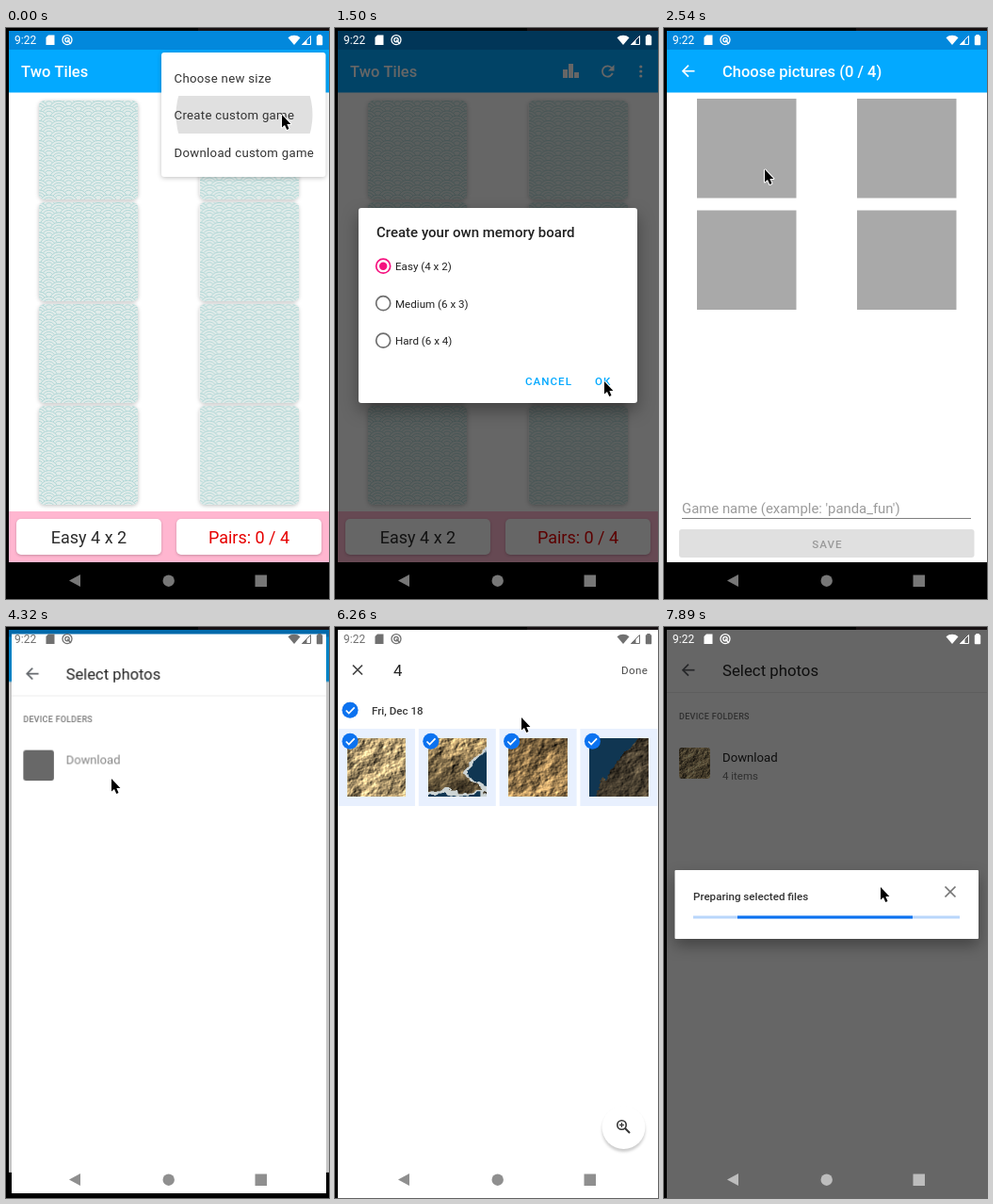
Recreate the animation shown at these times as an HTML page with a canvas. Size 343 by 606 pixels, loop 8000 ms.

```html
<!DOCTYPE html>
<html lang="en">
<head>
<meta charset="utf-8">
<title>Custom board walkthrough</title>
<style>
html, body { margin: 0; width: 100%; height: 100%; overflow: hidden; background: #000; }
canvas { display: block; }
</style>
</head>
<body>
<canvas id="stage" width="343" height="606"></canvas>
<script>
const W = 343, H = 606, LOOP = 8000, STEP = 149, TAU = Math.PI * 2;
const FONT = 'Roboto, "Noto Sans", sans-serif';
const BLUE = '#03a9ff', CHECK = '#0b72f0';

const makeContext = (w, h) => {
  const canvas = document.createElement('canvas');
  canvas.width = w;
  canvas.height = h;
  return canvas.getContext('2d');
};
const stage = document.getElementById('stage').getContext('2d');
const buffer = makeContext(W, H);
let g = stage;

// ---- timing ----
const heldTime = t => STEP * Math.floor((t + 8) / STEP);
const ramp = (t, a, b) => Math.max(0, Math.min(1, (t - a) / (b - a)));
const easeOut = p => 1 - (1 - p) ** 3;
const smooth = p => p * p * (3 - 2 * p);
const mix = (a, b, p) => a + (b - a) * p;

const MOVES = [
  { from: 450, to: 1490, x: 286, y: 375 },   // OK
  { from: 1930, to: 2530, x: 107, y: 150 },  // first slot
  { from: 2840, to: 3270, x: 148, y: 227 },
  { from: 3270, to: 3570, x: 112, y: 161 },
  { from: 4330, to: 4760, x: 88, y: 147 },   // folder
  { from: 5060, to: 5660, x: 15, y: 89 },    // date check
  { from: 5950, to: 6250, x: 198, y: 96 },
  { from: 6260, to: 7000, x: 332, y: 39 },   // Done
  { from: 7300, to: 7890, x: 230, y: 276 }
];
function pointerAt(t) {
  let x = 293, y = 92;
  for (const move of MOVES) {
    const p = smooth(ramp(t, move.from, move.to));
    x = mix(x, move.x, p);
    y = mix(y, move.y, p);
  }
  return [x, y];
}

// ---- drawing helpers ----
function rect(x, y, w, h, color) {
  g.fillStyle = color;
  g.fillRect(x, y, w, h);
}
function round(x, y, w, h, r, color) {
  g.fillStyle = color;
  g.beginPath();
  g.roundRect(x, y, w, h, r);
  g.fill();
}
function shadowed(blur, drop, strength, draw) {
  g.save();
  g.shadowColor = `rgba(0,0,0,${strength})`;
  g.shadowBlur = blur;
  g.shadowOffsetY = drop;
  draw();
  g.restore();
}
function raised(x, y, w, h, r, blur, drop, strength) {
  shadowed(blur, drop, strength, () => round(x, y, w, h, r, '#fff'));
}
function disc(x, y, r, color) {
  g.fillStyle = color;
  g.beginPath();
  g.arc(x, y, r, 0, TAU);
  g.fill();
}
function ring(x, y, r, width, color, start = 0, end = TAU) {
  g.strokeStyle = color;
  g.lineWidth = width;
  g.beginPath();
  g.arc(x, y, r, start, end);
  g.stroke();
}
function trace(points) {
  g.beginPath();
  points.forEach(([x, y], i) => i ? g.lineTo(x, y) : g.moveTo(x, y));
}
function poly(points, color) {
  trace(points);
  g.fillStyle = color;
  g.fill();
}
function line(points, width, color) {
  trace(points);
  g.strokeStyle = color;
  g.lineWidth = width;
  g.stroke();
}
function text(s, x, y, size, color, { weight = 400, align = 'left', spacing = 0 } = {}) {
  g.font = `${weight} ${size}px ${FONT}`;
  g.letterSpacing = spacing + 'px';
  g.textAlign = align;
  g.textBaseline = 'alphabetic';
  g.fillStyle = color;
  g.fillText(s, x, y + size * 0.355);
}
// Draws a whole window, scaled about the middle of the screen.
function layer(draw, scale = 1, alpha = 1) {
  if (alpha <= 0) return;
  g = buffer;
  g.clearRect(0, 0, W, H);
  draw();
  g = stage;
  g.save();
  g.globalAlpha = alpha;
  g.translate(173, 303);
  g.scale(scale, scale);
  g.translate(-173, -303);
  g.drawImage(buffer.canvas, 3, 3, W - 3, H - 3, 3, 3, W - 3, H - 3);
  g.restore();
}
const dim = amount => rect(3, 3, W - 3, H - 3, `rgba(0,0,0,${amount})`);

// ---- textures ----
function render(size, draw) {
  g = makeContext(size, size);
  draw();
  const canvas = g.canvas;
  g = stage;
  return canvas;
}
const cardFace = render(105, () => {
  const r = 10.5, paper = '#e2ecea';
  g.beginPath();
  g.roundRect(0, 0, 105, 105, 6);
  g.clip();
  rect(0, 0, 105, 105, paper);
  for (let row = 0; row < 24; row++) {
    for (let col = -1; col < 7; col++) {
      const x = (col + row % 2 / 2) * 2 * r, y = row * r / 2;
      disc(x, y, r, paper);
      for (let k = 0; k < 3; k++) ring(x, y, r - 0.4 - k * 2.8, 0.75, '#9fcfcf');
    }
  }
});

function hash(x, y) {
  const s = Math.sin(x * 127.1 + y * 311.7) * 43758.5453;
  return s - Math.floor(s);
}
function noise(x, y) {
  const i = Math.floor(x), j = Math.floor(y), p = smooth(x - i), q = smooth(y - j);
  return mix(mix(hash(i, j), hash(i + 1, j), p), mix(hash(i, j + 1), hash(i + 1, j + 1), p), q);
}
function relief(u, v, seed) {
  let sum = 0;
  for (let k = 0, f = 1; k < 4; k++, f *= 2) {
    sum += noise((u * 5 + v * 3) * f + seed, (v * 5 - u * 2) * f + seed) * 0.62 ** k;
  }
  return sum / 2.2;
}
// Soft rocky slopes lit from one side; `sea` is positive where water lies.
const PHOTOS = [
  { rock: [178, 155, 112], light: () => 1, sea: () => -1 },
  { rock: [158, 134, 92], light: (u, v) => 1.15 - 0.75 * v, foam: true,
    sea: (u, v) => Math.max(u - 0.58 - 1.1 * Math.abs(v - 0.55), v - 0.91) },
  { rock: [150, 121, 78], light: (u, v) => 0.75 + 0.4 * v, sea: () => -1 },
  { rock: [72, 63, 48], light: u => 0.7 + 0.4 * u, sea: (u, v) => 0.8 - u - 0.78 * v }
].map(({ rock, light, sea, foam }, n) => render(84, () => {
  const image = g.createImageData(84, 84), seed = n * 17 + 3;
  for (let i = 0; i < 84 * 84; i++) {
    const u = i % 84 / 84, v = Math.floor(i / 84) / 84, h = relief(u, v, seed);
    const slope = relief(u + 0.02, v + 0.012, seed) - h;
    const shade = light(u, v) * (0.55 + 0.85 * h + slope * 5);
    const depth = sea(u, v) + (h - 0.5) * 0.25;
    let color = rock.map(c => c * shade);
    if (depth > 0) color = foam && depth < 0.06 ? [205, 212, 212] : [16, 54, 82];
    image.data.set([...color, 255], i * 4);
  }
  g.putImageData(image, 0, 0);
}));

// ---- icons ----
function backArrow(x, y, color) {
  line([[x + 6.5, y], [x - 5.5, y]], 1.7, color);
  line([[x, y - 6], [x - 6, y], [x, y + 6]], 1.7, color);
}
function cross(x, y, r, color) {
  line([[x - r, y - r], [x + r, y + r]], 1.7, color);
  line([[x + r, y - r], [x - r, y + r]], 1.7, color);
}
function tick(x, y, alpha) {
  g.save();
  g.globalAlpha *= alpha;
  disc(x, y, 8.5, CHECK);
  line([[x - 4.3, y + 0.2], [x - 1.3, y + 3.2], [x + 4.7, y - 3]], 1.7, '#fff');
  g.restore();
}
function statusIcons(color) {
  text('9:22', 9, 12.6, 12, color);
  poly([[45, 7.5], [51.5, 7.5], [51.5, 18], [42.5, 18], [42.5, 10]], color);
  ring(65, 12.6, 5, 1.3, color);
  ring(65, 12.6, 2.2, 1.3, color);
  line([[65, 12.6], [69, 17]], 1.4, color);
  g.fillStyle = color;
  g.beginPath();
  g.moveTo(306, 18);
  g.arc(306, 18, 10.2, -Math.PI * 0.72, -Math.PI * 0.28);
  g.fill();
  line([[314.5, 17.5], [323.5, 17.5], [323.5, 8.5], [314.5, 17.5]], 1, color);
  poly([[314, 18], [319.5, 12.5], [319.5, 18]], color);
  rect(331.3, 7, 3.4, 2, color);
  round(329.8, 8.2, 6.4, 10, 0.8, color);
}
function navIcons(color) {
  poly([[67, 586.5], [79, 580], [79, 593]], color);
  disc(172.7, 586.7, 6.2, color);
  rect(264.5, 580.5, 12.5, 12.5, color);
}
function pointer(x, y) {
  g.save();
  g.translate(x, y);
  g.lineJoin = 'round';
  const arrow = [[0, 0], [0, 13.6], [3, 10.9], [5.3, 16], [7.5, 15], [5.4, 10.1], [9.4, 9.9], [0, 0]];
  line(arrow, 2, '#fff');
  poly(arrow, '#000');
  g.restore();
}
function magnifier(x, y) {
  ring(x, y, 4.7, 1.6, '#333');
  line([[x + 3.5, y + 3.5], [x + 8.5, y + 8.5]], 2, '#333');
  line([[x - 2.5, y], [x + 2.5, y]], 1.2, '#333');
  line([[x, y - 2.5], [x, y + 2.5]], 1.2, '#333');
}

// ---- windows ----
function appBase() {
  rect(3, 3, 340, 564, '#fff');
  rect(3, 3, 340, 20, '#0288dc');
  rect(3, 23, 340, 45.5, BLUE);
  rect(3, 567, 340, 39, '#000');
}
function game() {
  appBase();
  text('Two Tiles', 16, 46.3, 16.5, '#fff', { weight: 500 });
  rect(242, 44, 5, 9, '#fff');
  rect(248, 38, 5, 15, '#fff');
  rect(254, 47, 5, 6, '#fff');
  ring(289.5, 46, 5.6, 1.8, '#fff', 0.35, TAU - 0.75);
  poly([[296.5, 39], [296.5, 45.5], [290, 45.5]], '#fff');
  for (let i = 0; i < 3; i++) disc(324.8, 41 + i * 5, 1.6, '#fff');
  for (let i = 0; i < 8; i++) {
    const x = 35 + i % 2 * 170.5, y = 77 + Math.floor(i / 2) * 108;
    raised(x, y, 105, 105, 6, 4, 1, 0.25);
    g.drawImage(cardFace, x, y);
  }
  rect(3, 513, 340, 54, '#ffb6d0');
  ['Easy 4 x 2', 'Pairs: 0 / 4'].forEach((s, i) => {
    raised(11 + i * 170, 521, 154, 38, 5, 3, 1, 0.22);
    text(s, 88 + i * 170, 541, 18, i ? '#e60000' : '#2c2c2c', { align: 'center' });
  });
}
function menu(pressedFully) {
  raised(165, 26, 174.5, 132, 3, 5, 1, 0.25);
  g.save();
  g.beginPath();
  g.rect(165, 72, 174.5, 40);
  g.clip();
  disc(253, 92, pressedFully ? 110 : 72.5, '#e0e0e0');
  g.restore();
  ['Choose new size', 'Create custom game', 'Download custom game'].forEach((s, i) =>
    text(s, 178.5, 53 + i * 39.6, 13.2, '#333', { spacing: 0.3 }));
}
function sizeDialog() {
  raised(25, 191, 296, 207, 3, 18, 8, 0.35);
  text('Create your own memory board', 44, 217, 15, '#212121', { weight: 500 });
  ['Easy (4 x 2)', 'Medium (6 x 3)', 'Hard (6 x 4)'].forEach((s, i) => {
    const y = 253 + i * 39.5, color = i ? '#6f6f6f' : '#f5117f';
    ring(51.2, y - 0.3, 7.5, 1.7, color);
    if (!i) disc(51.2, y - 0.3, 4.2, color);
    text(s, 64, y + 0.3, 11.6, '#212121');
  });
  text('CANCEL', 202, 375, 11.6, BLUE, { weight: 500, spacing: 1 });
  text('OK', 276, 375, 11.6, BLUE, { weight: 500, spacing: 1 });
}
function customBoard() {
  appBase();
  backArrow(26, 45.7, '#fff');
  text('Choose pictures (0 / 4)', 62, 46.3, 16.5, '#fff', { weight: 500 });
  for (let i = 0; i < 4; i++) rect(35 + i % 2 * 170, i < 2 ? 75 : 193.5, 105.5, 105.5, '#a9a9a9');
  text("Game name (example: 'panda_fun')", 19, 509.3, 14.9, '#9b9b9b');
  rect(19, 520, 307, 1, '#808080');
  round(16, 532, 313.5, 30, 3, '#e0e0e0');
  text('SAVE', 173.3, 547.5, 11.6, '#9a9a9a', { weight: 500, align: 'center', spacing: 1 });
}
function picker(loaded, pressed) {
  rect(3, 3, 340, 603, '#fff');
  backArrow(26, 45.7, '#5f6368');
  text('Select photos', 62, 46, 16.8, '#222');
  rect(3, 69, 340, 1, '#ececec');
  text('DEVICE FOLDERS', 16, 95.3, 9, '#757575', { weight: 500, spacing: 0.3 });
  if (pressed) rect(3, 118, 340, 53, '#e4e4e4');
  if (loaded) {
    g.save();
    g.beginPath();
    g.roundRect(16, 128, 33, 33, 3);
    g.clip();
    g.drawImage(PHOTOS[0], 16, 128, 33, 33);
    g.restore();
    text('4 items', 62, 158, 11.5, '#757575');
  } else {
    round(16, 128, 33, 33, 3, '#686868');
  }
  text('Download', 62, 138, 13.2, loaded ? '#222' : '#858585');
}
function photoGrid(selected, loaded) {
  rect(3, 3, 340, 603, '#fff');
  if (selected > 0) {
    cross(24, 45.5, 5, '#444');
    text('4', 62, 46, 16.8, '#222');
    text('Done', 304, 45.5, 11.6, '#4a4a4a', { spacing: 0.4 });
  } else {
    backArrow(26, 45.7, '#5f6368');
    text('Download', 62, 46, 16.8, '#222');
  }
  ring(16, 88, 7.6, 1.4, '#9aa0a6');
  tick(16, 88.3, selected);
  text('Fri, Dec 18', 39, 89.2, 11.6, '#3a3a3a', { weight: 500 });
  PHOTOS.forEach((photo, i) => {
    const x = 3 + i * 85.8, inset = 9.7 * selected, size = 82 - 2 * inset;
    rect(x, 108, 82, 82, loaded ? '#e8f0fe' : '#eeeeee');
    if (loaded) g.drawImage(photo, x + inset, 108 + inset, size, size);
    tick(x + 13, 121.3, selected);
  });
  shadowed(3, 3, 0.2, () => disc(306.5, 531, 23, '#fff'));
  magnifier(304.5, 528.5);
}
function progressDialog(t) {
  raised(11.5, 258, 322.5, 73, 1, 16, 7, 0.35);
  text('Preparing selected files', 31, 286.3, 11.6, '#333', { weight: 500 });
  cross(304, 281, 5.5, '#757575');
  if (t < 7400) return;
  const head = 31 + 233 * ramp(t, 7400, 7890), tail = 31 + 47 * ramp(t, 7690, 7890);
  rect(31, 306.5, 283, 3, '#b9d6fb');
  rect(tail, 306.5, head - tail, 3, CHECK);
}

// ---- scenes ----
// The new window grows in while the old one swells and darkens behind it.
function openWindow(from, to, p, shade = 0.25) {
  const e = easeOut(p);
  if (p < 1) {
    layer(from, 1 + 0.05 * e);
    dim(shade * e);
  }
  layer(to, 0.85 + 0.15 * e, Math.min(1, p * 4));
}
function scene(t) {
  if (t < 1900) {
    layer(game);
    layer(() => menu(t >= STEP), 1, 1 - ramp(t, 300, 590));
    const shown = Math.min(ramp(t, 400, 700), 1 - ramp(t, 1650, 1950));
    dim(0.6 * shown);
    layer(sizeDialog, 1, shown);
  } else if (t < 3860) {
    openWindow(game, customBoard, ramp(t, 1900, 2420));
  } else if (t < 4900) {
    openWindow(customBoard, () => picker(t > 4400), ramp(t, 4010, 4590));
  } else if (t < 7100) {
    openWindow(() => picker(true, true), () => photoGrid(ramp(t, 5900, 6200), t > 5300), ramp(t, 4990, 5490), 0.1);
  } else {
    const e = easeOut(ramp(t, 7140, 7680)), scale = 1.1 - 0.1 * e;
    layer(() => picker(true), scale);
    layer(() => photoGrid(1, true), 1 - 0.1 * e, 1 - ramp(t, 7100, 7200));
    dim(0.6 * ramp(t, 7220, 7460));
    layer(() => progressDialog(t), scale, ramp(t, 7150, 7370));
  }
}
function systemBars(t) {
  const onWhite = t > 4100 && t < 7200, leaving = t >= 7200 && t < 7400;
  if (!leaving) statusIcons(onWhite ? '#707070' : '#fff');
  navIcons(t < 4100 ? '#777' : onWhite ? '#8f8f8f' : leaving ? '#7d7d7d' : '#bdbdbd');
}
function paint(now) {
  const t = heldTime(now % LOOP);
  g = stage;
  rect(0, 0, W, H, '#000');
  rect(204, 0, 139, 3, '#171113');
  g.save();
  g.beginPath();
  g.rect(3, 3, W - 3, H - 3);
  g.clip();
  scene(t);
  systemBars(t);
  pointer(...pointerAt(t));
  g.restore();
}

const begin = performance.now();
function animate() {
  paint(performance.now() - begin);
  requestAnimationFrame(animate);
}
animate();
</script>
</body>
</html>
```
